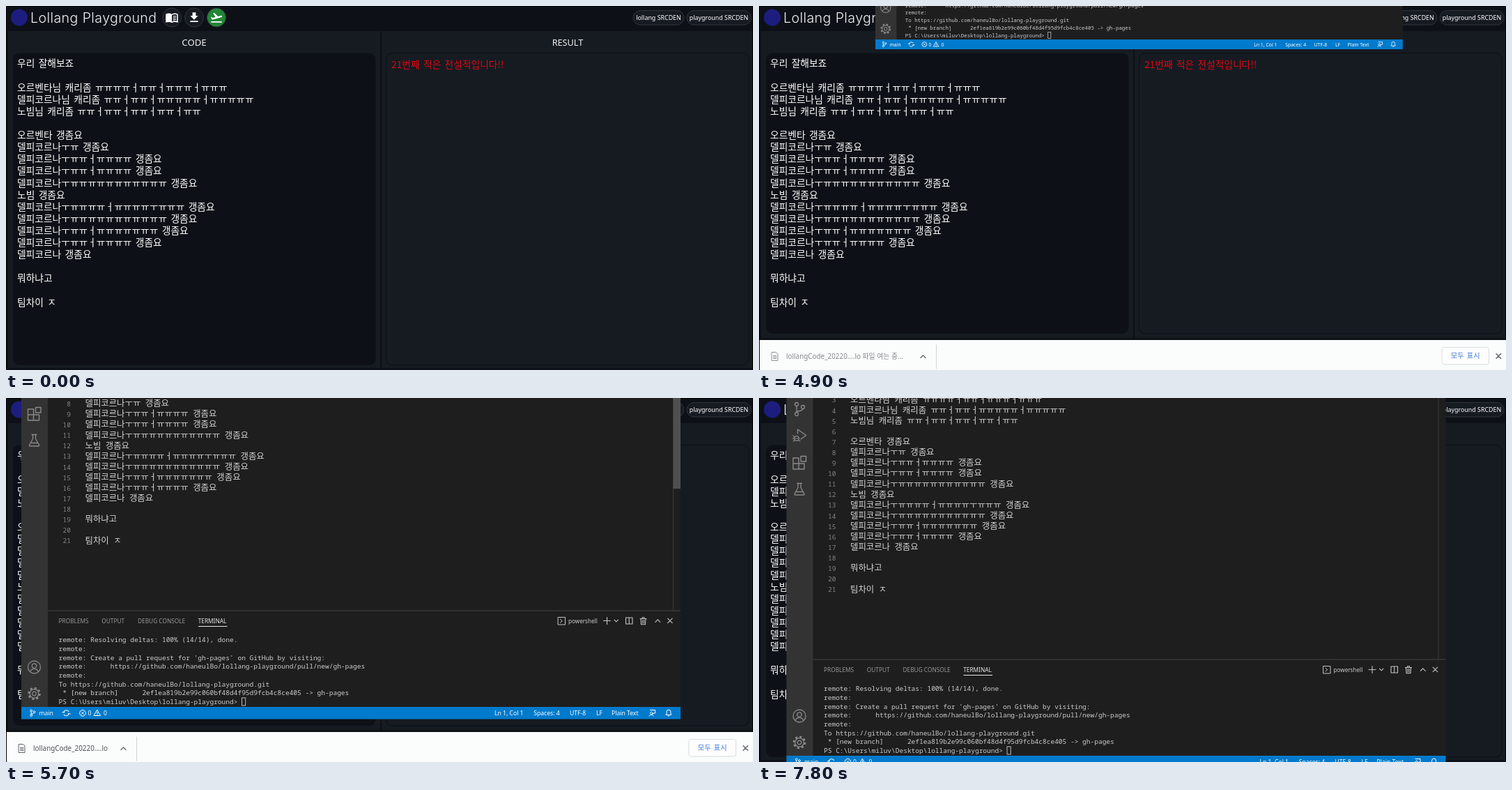
These frames come from a looping animation (1072 px wide and 522 px high, 9 s). An HTML page:

```html
<!DOCTYPE html>
<html lang="ko">
<head>
<meta charset="utf-8">
<title>Lollang Playground</title>
<style>
html, body { margin: 0; width: 100%; height: 100%; overflow: hidden; background: #000; }
svg { display: block; width: 100%; height: 100%; }
text { font-family: "Noto Sans", "Noto Sans CJK KR", sans-serif; }
.title { font: 300 19.6px Inter, sans-serif; letter-spacing: .4px; }
.ko { font-family: "Noto Sans CJK KR", "Noto Sans CJK JP", sans-serif; }
.code { font-size: 13.75px; word-spacing: 1.5px; }
.edit { font-size: 12.4px; font-weight: 300; word-spacing: 3px; }
.mono { font-family: "Noto Sans Mono", monospace; }
.mid { text-anchor: middle; }
.end { text-anchor: end; }
.line { fill: none; stroke-linecap: round; stroke-linejoin: round; }
</style>
</head>
<body>
<svg id="stage" viewBox="0 0 1072 522" xmlns="http://www.w3.org/2000/svg"></svg>
<script>
const LOOP = 9000, STEP = 100;
const WIN_W = 946, WIN_H = 635;

const A = '오르벤타', B = '델피코르나', C = '노빔', GO = ' 갱좀요';
const many = n => 'ㅠ'.repeat(n);
const runs = (...ns) => ns.map(many).join('ㅓ');
const source = [
  '우리 잘해보죠', '',
  A + '님 캐리좀 ' + runs(4, 2, 3, 3),
  B + '님 캐리좀 ' + runs(2, 2, 5, 5),
  C + '님 캐리좀 ' + runs(2, 2, 2, 2, 2), '',
  A + GO,
  B + 'ㅜㅠ' + GO,
  B + 'ㅜ' + runs(2, 4) + GO,
  B + 'ㅜ' + runs(2, 4) + GO,
  B + 'ㅜ' + many(11) + GO,
  C + GO,
  B + 'ㅜ' + runs(4, 4) + 'ㅜ' + many(3) + GO,
  B + 'ㅜ' + many(11) + GO,
  B + 'ㅜ' + runs(2, 7) + GO,
  B + 'ㅜ' + runs(2, 4) + GO,
  B + GO, '', '뭐하냐고', '', '팀차이 ㅈ'
];

const repo = 'https://github.com/haneulBo/lollang-playground';
const output = [
  'remote: Resolving deltas: 100% (14/14), done.',
  'remote:',
  "remote: Create a pull request for 'gh-pages' on GitHub by visiting:",
  'remote:      ' + repo + '/pull/new/gh-pages',
  'remote:',
  'To ' + repo + '.git',
  ' * [new branch]      2ef1ea819b2e99c060bf48d4f95d9fcb4c8ce405 -> gh-pages',
  'PS C:\\Users\\miluv\\Desktop\\lollang-playground>'
];

// Window position (left, top) for every step of the drag, from 4900 ms on
const DRAG_START = 4900;
const drag = [
  [167, -446], [96, -402], [40, -364], [5, -333], [0, -312], [10, -265], [20, -225], [28, -195],
  [22, -174.5], [21.5, -165], [26, -154], [32, -142], [38, -131.5], [47, -118], [44, -109], [39.5, -104.5]
];

const esc = s => s.replace(/&/g, '&amp;').replace(/</g, '&lt;').replace(/ /g, '\u00a0');
const text = (x, y, s, size, fill, cls = '', more = '') =>
  `<text x="${x}" y="${y}" fill="${fill}" class="${cls}" ${size ? `font-size="${size}"` : ''} ${more}>${esc(s)}</text>`;
const rect = (x, y, w, h, fill, more = '') =>
  `<rect x="${x}" y="${y}" width="${w}" height="${h}" fill="${fill}" ${more}/>`;
const circle = (x, y, r, fill, more = '') =>
  `<circle cx="${x}" cy="${y}" r="${r}" fill="${fill}" ${more}/>`;
const line = (d, stroke, w = 1, more = '') =>
  `<path class="line" d="${d}" stroke="${stroke}" stroke-width="${w}" ${more}/>`;
const at = (x, y, body, more = '') => `<g transform="translate(${x} ${y})" ${more}>${body}</g>`;

function headButton(x, fill, path, id) {
  return circle(x, 16.5, 13.5, fill, `stroke="#30363d" id="${id}"`) +
    `<path transform="translate(${x - 9.6} 6.9) scale(.8)" fill="#fff" fill-rule="evenodd" d="${path}"/>`;
}

const BOOK = 'M21 5c-1.11-.35-2.33-.5-3.5-.5-1.95 0-4.05.4-5.5 1.5-1.45-1.1-3.55-1.5-5.5-1.5S2.45 4.9 1 6v14.65c0 .25.25.5.5.5' +
  'C3.1 20.45 5.05 20 6.5 20c1.95 0 4.05.4 5.5 1.5 1.35-.85 3.8-1.5 5.5-1.5 1.65 0 3.35.3 4.75 1.05.5.1.75-.2.75-.45V6c-.6-.45-1.25-.75-2-1z' +
  'm0 13.5c-1.1-.35-2.3-.5-3.5-.5-1.7 0-4.15.65-5.5 1.5V8c1.35-.85 3.8-1.5 5.5-1.5 1.2 0 2.4.15 3.5.5v11.5z' +
  'M14 9.5q2.5-1 5.5-.5v1.4q-3-.5-5.5.5zM14 12.5q2.5-1 5.5-.5v1.4q-3-.5-5.5.5zM14 15.5q2.5-1 5.5-.5v1.4q-3-.5-5.5.5z';
const DOWN = 'M19 9h-4V3H9v6H5l7 7 7-7zM5 18v2h14v-2H5z';
const PLANE = 'M2.5 19h19v2h-19zm19.57-9.36c-.21-.8-1.04-1.28-1.84-1.06L14.92 10l-6.9-6.43-1.93.51 4.14 7.17-4.97 1.33' +
  '-1.97-1.54-1.45.39 1.82 3.16.77 1.33 1.6-.43 5.31-1.42 4.35-1.16L21 11.49c.81-.23 1.28-1.05 1.07-1.85z';

function page() {
  const pill = (x, w, s) => rect(x, 6.5, w, 20.5, '#161b22', 'rx="10.2" stroke="#30363d"') +
    text(x + w / 2, 20, s, 8.9, '#fff', 'mid');
  return rect(1, 1, 1070, 521, '#0d1117') +
    rect(3, 36, 534, 483, '#161b22', 'class="main"') +
    rect(539, 36, 532, 483, '#161b22', 'class="main"') +
    rect(10, 67.5, 520.5, 447, '#0d1117', 'rx="9" class="pane"') +
    rect(545.5, 67.5, 520.5, 447, '#161b22', 'rx="9" stroke="#0b0f14" class="pane"') +
    circle(19, 16.5, 12, '#1d1d80') +
    text(35, 23.6, 'Lollang Playground', 0, '#f0f3f6', 'title') +
    headButton(238, '#161b22', BOOK, 'book') +
    headButton(270, '#161b22', DOWN, 'save') +
    headButton(302, '#238636', PLANE, 'run') +
    pill(900, 73, 'lollang SRCDEN') + pill(977, 92, 'playground SRCDEN') +
    text(270, 57, 'CODE', 13.2, '#f0f0f0', 'mid') +
    text(806, 57, 'RESULT', 12.7, '#f0f0f0', 'mid') +
    source.map((s, i) => text(16, 87.3 + i * 17.12, s, 0, '#fff', 'ko code')).join('') +
    text(553, 89.3, '21번째 적은 전설적입니다!!', 0, '#e3060f', 'ko code', 'font-weight="500"') +
    `<g id="tip">${rect(203.5, 37, 133, 30, '#757575', 'rx="4"')}${text(270, 57, 'DOWNLOAD CODE', 12.2, '#fff', 'mid')}</g>`;
}

function shelf() {
  const file = line('M18.5 496.5H24.5L27 499V508.5H18.5ZM20.5 501.5H25M20.5 503.5H25M20.5 505.5H25', 'currentColor', .9);
  return `<g id="shelf">` + rect(1, 479, 1071, 60, '#fbfcfc') +
    `<g id="chip">${file}${text(39, 506, '', 9.9, 'currentColor', '', 'id="name"')}</g>` +
    line('M10 -9.8', '#fff') +
    `<circle id="spin" cx="23" cy="502.5" r="10" fill="none" stroke="#2a6fdb" stroke-width="1.8" stroke-dasharray="48 15"/>` +
    `<g id="edge">${line('M-22 504.5L-18.5 501L-15 504.5', '#5f6368', 1.3)}${line('M.5 486V520', '#d0d3d6')}</g>` +
    rect(980, 489.5, 67.5, 24.5, '#fdfdfd', 'rx="3" stroke="#dadce0"') +
    text(1013.7, 505.2, '모두 표시', 10.2, '#3b78d8', 'ko mid', 'word-spacing="1.5"') +
    line('M1058 498.7L1064.6 505.3M1064.6 498.7L1058 505.3', '#5f6368', 1.5) + '</g>' +
    `<g id="bubble">${circle(28, 0, 28.5, '#fff', 'opacity=".93"')}` +
    `<path fill="#4285f4" d="M24.3 -11H31.7V-4H36L28 5L20 -4H24.3ZM15 16.5H41V19.5H15Z"/></g>`;
}

function activityBar() {
  const g = '#8a8a8a', ic = (y, body) => at(18.5, y, body);
  const ring = (x, y, r, w = 1.3, more = '') => circle(x, y, r, 'none', `stroke="${g}" stroke-width="${w}" ${more}`);
  return rect(0, 0, 38, WIN_H, '#333') +
    ic(120.5, ring(-4, -7, 2.5) + ring(-4, 7, 2.5) + ring(5, -3, 2.5) + line('M-4 -4.5V4.5M5 -.5Q4 3-4 3', g, 1.3)) +
    ic(158.5, line('M-2.5 -3V-9L9.5 -.5L2 5', g, 1.4) + ring(-4, 4, 3.4) +
      line('M-7.4 4H-.6M-9 0L-7 2M-9 8L-7 6.5M1 8L-1 6.5M-10 4H-8', g, 1.1)) +
    ic(197, line('M-9 -6.5H-1V9.5H-9ZM-9 1.5H7V9.5H-1M2 -9H9.5V-1.5H2Z', g, 1.4)) +
    ic(235, line('M-3.5 -8H3.5M-2 -8V-2L-7 7Q-7.5 8.5-6 8.5H6Q7.5 8.5 7 7L2 -2V-8M-5 4H5', g, 1.3)) +
    ic(560.5, ring(0, 0, 9) + ring(0, -2, 3.2) + line('M-5.8 6.8A6 6 0 0 1 5.8 6.8', g, 1.3)) +
    ic(598.5, ring(0, 0, 2.8) + ring(0, 0, 6.3) + ring(0, 0, 8, 2.6, 'stroke-dasharray="3.14 3.143"'));
}

function panel() {
  const g = '#c5c5c5', tab = (x, s, c = '#969696') => text(x, 497.2, s, 8.3, c);
  return rect(38, 479, 908, 1, '#454545') +
    tab(53.5, 'PROBLEMS') + tab(115.3, 'OUTPUT') + tab(167, 'DEBUG CONSOLE') + tab(253.7, 'TERMINAL', '#e7e7e7') +
    rect(254, 501.5, 41.5, 1, '#e7e7e7') +
    line('M770.5 489H780.5V499.5H770.5ZM773.5 491.8L776.3 494.2L773.5 496.7', g) +
    text(785, 497.5, 'powershell', 8.15, '#ccc') +
    line('M835.5 494H845.5M840.5 489V499M851 492.7L853.7 495.4L856.4 492.7', g, 1.1) +
    line('M867.5 489.5H877V498.5H867.5ZM872.2 489.5V498.5', g, 1.1) +
    line('M888 491H897M891 491V489.3H894V491M889 491L889.5 499.3H895.5L896 491M891.5 493V497.5M893.6 493V497.5', g, 1.1) +
    line('M909.8 495.8L913.3 492.3L916.8 495.8M927.6 490.6L934.2 497.2M934.2 490.6L927.6 497.2', g, 1.1) +
    output.map(s => text(53.5, 0, s, 9.53, '#ccc', 'mono term')).join('') +
    rect(0, 604.5, 5.2, 11, 'none', 'stroke="#ccc" stroke-width=".9" id="caret"');
}

function statusBar() {
  const w = '#fff', item = (x, s) => text(x, 629.8, s, 8.6, w);
  return rect(0, 617.5, WIN_W, 17.5, '#007acc') +
    at(16, 626.2, circle(-1.8, -3.3, 1.4, 'none', 'stroke="#fff"') + circle(-1.8, 3.3, 1.4, 'none', 'stroke="#fff"') +
      circle(2.5, -1.6, 1.4, 'none', 'stroke="#fff"') + line('M-1.8 -1.9V1.9M2.5 -.2Q2 1.6-1.8 1.6', w)) +
    item(25.5, 'main') +
    line('M60.5 625.5A4.2 4.2 0 0 1 68 624M68.5 627A4.2 4.2 0 0 1 61 628.5M58.8 625.2H62M67 627.3H70.3', w, 1.1) +
    circle(88, 626.3, 4.3, 'none', 'stroke="#fff"') + line('M86.4 624.7L89.6 627.9M89.6 624.7L86.4 627.9', w, .9) +
    item(95.5, '0') + line('M109 622L113.5 630H104.5ZM109 625V627.4M109 628.6V628.8', w) + item(118, '0') +
    item(679, 'Ln 1, Col 1') + item(735.3, 'Spaces: 4') + item(787, 'UTF-8') + item(825, 'LF') + item(847, 'Plain Text') +
    line('M902.5 622H909.5V626.5H907.5L906 628.3V626.5M904 624.7A1.6 1.6 0 1 0 904.1 624.7M900.8 630.5Q904 626.5 907 630.5', w) +
    line('M925.2 628.8H932.8L931.9 627V624.5A2.9 2.9 0 0 0 926.1 624.5V627ZM928.2 630.4H929.8', w);
}

function editor() {
  const rows = source.map((s, i) => {
    const y = 383 - (20 - i) * 15.1;
    return text(71, y - .3, String(i + 1), 9.5, '#858585', 'mono end') + text(91.5, y, s, 0, '#d4d4d4', 'ko edit');
  }).join('');
  return rect(0, 0, WIN_W, WIN_H, '#1e1e1e') + rows +
    rect(935, 0, 1, 479, '#3a3a3a') + rect(935.5, 60, 10.5, 244.5, '#4f4f4f', 'id="bar"');
}

const stage = document.getElementById('stage');
stage.innerHTML = page() + shelf() + rect(0, 0, WIN_W, 0, '#000', 'id="blank"') +
  `<g id="win">${editor()}${activityBar()}${panel()}${statusBar()}</g>`;

const $ = id => document.getElementById(id);
const all = s => [...stage.querySelectorAll(s)];
const set = (el, o) => { for (const k in o) el.setAttribute(k, o[k]); };
const show = (id, on) => { $(id).style.display = on ? '' : 'none'; };
const clamp = v => Math.max(0, Math.min(1, v));
const mains = all('.main'), panes = all('.pane'), term = all('.term');

function drawPage(t) {
  const open = t >= 1500 && t < 7500;
  const top = !open ? 524 : t < 1600 ? 508 : t < 1700 ? 490 : 479;
  mains.forEach(e => set(e, { height: Math.min(top - 3, 519) - 36 }));
  panes.forEach(e => set(e, { height: top - 9 - 67.5 }));
  show('shelf', open);
  set($('shelf'), { transform: `translate(0 ${top - 479})` });

  const hover = clamp(Math.min((t - 300) / 300, (2400 - t) / 300));
  set($('tip'), { opacity: hover });
  set($('save'), { fill: hover > .5 ? '#3a3f46' : hover > 0 ? '#282d34' : '#161b22' });
}

function drawChip(t) {
  const loading = t < 2300, opening = t >= 2500 && t < 5400;
  const edge = t < 2300 ? 131 : t < 2400 ? 160 : t < 2500 ? 187 : t < 2600 ? 222 : opening ? 254 : 187;
  $('name').textContent = loading || edge === 160 ? 'lollangCo...'
    : 'lollangCode_20220....lo' + (opening && t >= 2600 ? ' 파일 여는 중...' : '');
  $('chip').style.color = opening ? '#85888b' : '#4f5256';
  set($('edge'), { transform: `translate(${edge} 0)` });
  show('spin', loading);
  set($('spin'), { transform: `rotate(${t * .36 - 648} 23 502.5)` });

  const v = (t - 1430) / 600;
  show('bubble', v > 0 && v < 1);
  set($('bubble'), { transform: `translate(0 ${507.5 - 57 * v})`, opacity: clamp(1 - 4 * (v - .5) ** 2) });
}

function drawWindow(t) {
  const on = t >= DRAG_START, small = t < 5400;
  show('win', on);
  show('blank', t >= 5200 && small);
  if (!on) return;
  const [x, y] = drag[Math.min(drag.length - 1, Math.round((t - DRAG_START) / STEP))];
  set($('win'), { transform: `translate(${x} ${y}) scale(${small ? .8 : 1})` });
  set($('blank'), { x, height: y + WIN_H });
  // terminal text snaps to another size on the smaller screen scale
  const size = small ? 9.28 : 9.53, pitch = small ? 13.5 : 12.7;
  term.forEach((e, i) => set(e, { y: 613.6 - (7 - i) * pitch, 'font-size': size }));
  set($('caret'), { x: 53.5 + 46 * size * .6 });
  show('bar', t < 6700);
}

function draw(now) {
  const t = Math.floor(now % LOOP / STEP) * STEP;
  drawPage(t);
  drawChip(t);
  drawWindow(t);
}

const start = performance.now();
function tick() {
  draw(performance.now() - start);
  requestAnimationFrame(tick);
}
tick();
</script>
</body>
</html>
```
